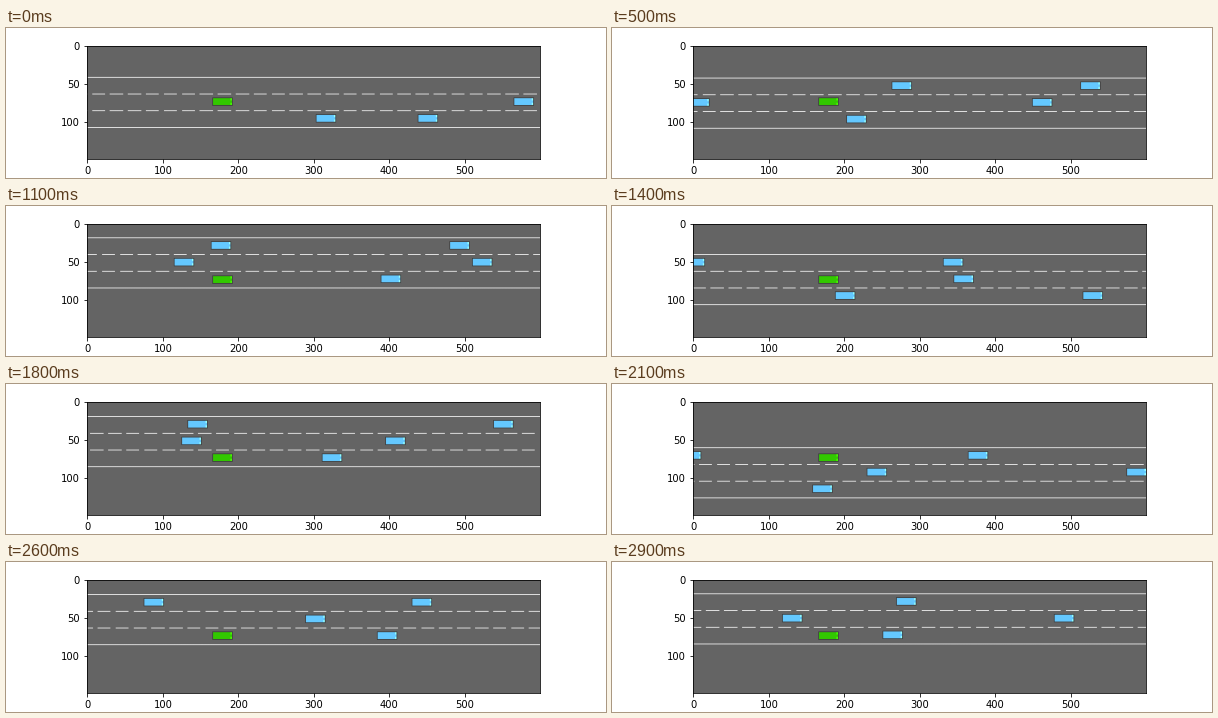
Animation, 600 px wide and 150 px high, one loop 3 s. Source, as a matplotlib script:

```python
import math

import numpy as np
import matplotlib.pyplot as plt
from matplotlib.animation import FuncAnimation

W, H, DPI = 600, 150, 72
STEPS, INTERVAL = 30, 100
LANE, DASH, PERIOD = 22, 16.5, 23.815
DASH_DRIFT = 1.2
EGO_X, EGO_Y = 180, 75

ASPHALT, WHITE, EDGE = (100, 100, 100), (255, 255, 255), (60, 60, 60)
BLUE, GREEN = (100, 200, 255), (50, 200, 0)

# Lane changes of the green car: start time and lane it eases into.
LOW = 2.06
EGO_MOVES = [(0, 0), (3, 1), (6.6, LOW), (12.67, 1), (16, LOW),
             (18, 1), (20, 0), (22, 1), (24.2, LOW)]

# Traffic by lane: time when level with the green car, relative speed.
TRAFFIC = {
    0: [(10.96, 58.2), (17.33, 49.6), (24.43, 57.8), (30.92, 53.7)],
    1: [(10.08, 55.7), (17.25, 55), (22.16, 55), (28.15, 57), (34.67, 55)],
    2: [(5.78, 47), (14.33, 67), (20.84, 51.1), (30.92, 44.3)],
}
# Cars that move one lane up at MERGE_TIME, keyed by their first lane.
MERGING = {1: [(6.6, 60.5)], 2: [(2.22, 61.6)]}
MERGE_TIME = 2


def ego_lane(t):
    """Lane of the green car, approached exponentially after each change."""
    lane = 1.03
    ends = [start for start, _ in EGO_MOVES[1:]] + [STEPS]
    for (start, goal), end in zip(EGO_MOVES, ends):
        if t > start:
            lane = goal + (lane - goal) * math.exp(-2 * (min(t, end) - start))
    return lane


def fill(img, x, y, w, h, color):
    img[max(y, 0):max(y + h, 0), max(x, 0):max(x + w, 0)] = color


def draw_car(img, x, y, color):
    left, top = x - 14, y - 6
    light = [min(int(c / 0.68), 255) for c in color]
    fill(img, left, top, 27, 11, EDGE)
    fill(img, left + 1, top + 1, 25, 9, color)
    for dy in (1, 7):
        fill(img, left + 24, top + dy, 2, 3, light)


def draw_road(img, t, top):
    for y in (top, top + 3 * LANE):
        fill(img, 0, y, W, 1, WHITE)
    phase = (7 + DASH_DRIFT * t) % PERIOD
    for start in phase + PERIOD * np.arange(-1, 26):
        x0, x1 = int(start), int(start + DASH)
        for y in (top + LANE, top + 2 * LANE):
            fill(img, x0, y, x1 - x0 + 1, 1, WHITE)


def draw_traffic(img, t, top, traffic, shift=0):
    for lane, cars in traffic.items():
        y = round(top + LANE * (lane - shift + 0.5))
        for level_time, speed in cars:
            x = round(EGO_X + speed * (level_time - t))
            draw_car(img, x, y, BLUE)


def render(t):
    img = np.full((H, W, 3), ASPHALT, dtype=np.uint8)
    top = int(EGO_Y - 10 - LANE * ego_lane(t))
    draw_road(img, t, top)
    draw_traffic(img, t, top, TRAFFIC)
    draw_traffic(img, t, top, MERGING, min(max(t - MERGE_TIME, 0), 1))
    draw_car(img, EGO_X, EGO_Y, GREEN)
    return img


fig, ax = plt.subplots(figsize=(W / DPI, H / DPI), dpi=DPI)
fig.subplots_adjust(left=0.125, right=0.9, bottom=0.125, top=0.88)
view = ax.imshow(render(0))
ax.set_xticks(range(0, 600, 100))
ax.set_yticks([0, 50, 100])


def update(step):
    view.set_data(render(step))
    return [view]


anim = FuncAnimation(fig, update, frames=STEPS, interval=INTERVAL, repeat=True)
plt.show()
```
